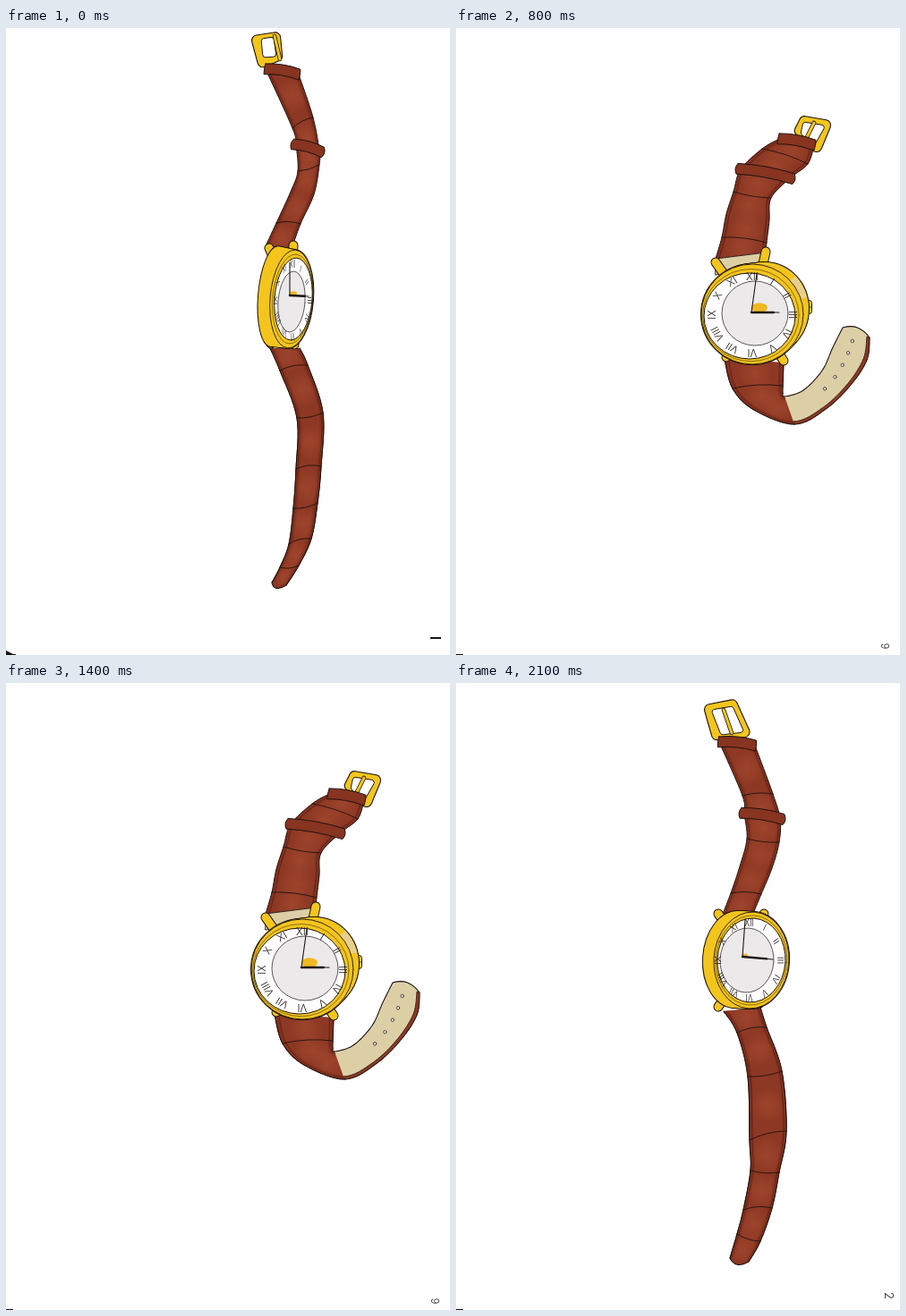
Animation of 496 by 701 pixels, one loop 2.2 s. Source, as an HTML page with a canvas:

```html
<!DOCTYPE html>
<html lang="en">
<head>
<meta charset="utf-8">
<title>Turning wristwatch</title>
<style>
html, body { margin: 0; width: 100%; height: 100%; overflow: hidden; background: #fefefe; }
canvas { display: block; width: 496px; height: 701px; }
</style>
</head>
<body>
<canvas id="stage"></canvas>
<script>
const STEP = 100, SHEETS = 12, LOOP = 2 * SHEETS - 2;
const INK = '#1d1310', GOLD = '#f3c51d', BROWN = '#8d3824', BEIGE = '#dccfa6', PAPER = '#fefefe';
const ROMAN = ['I', 'II', 'III', 'IV', 'V', 'VI', 'VII', 'VIII', 'IX', 'X', 'XI', 'XII'];
const SUB = 8; // curve samples between two stations

const canvas = document.getElementById('stage');
const ctx = canvas.getContext('2d');
const dpr = window.devicePixelRatio || 1;
canvas.width = 496 * dpr;
canvas.height = 701 * dpr;
ctx.scale(dpr, dpr);
ctx.lineJoin = ctx.lineCap = 'round';

// strap and tail: one station per row, left x,y then right x,y
// back, front, face, disc: cx, cy, rx, ry
const poses = {
  1: {
    strap: [290,46,327,52, 320,112,343,100, 324,131,350,138, 326,160,350,153, 318,183,344,186, 302,218,329,219, 289,246,318,250],
    tail: [295,358,328,358, 306,383,337,377, 325,436,354,430, 324,493,352,490, 321,537,348,531, 316,577,341,571, 306,603,327,601, 297,620,313,623],
    buckle: [273,9,306,4,309,35,283,46], hole: [285,12,299,10,302,32,287,33], prong: [300,9,306,35],
    back: [300,300,18,56], front: [319,303,24,55], face: [321,303,21,46], disc: [319,306,15,34],
    lugs: [294,246,321,243,296,353,322,354], hands: [317,299,317,262,338,300],
    crown: [342,300,2,6], tilt: .08, bill: 4, turn: 8
  },
  2: {
    strap: [294,66,334,70, 320,126,354,124, 322,146,362,152, 325,174,361,178, 317,205,353,207, 307,235,341,236, 298,258,331,260],
    tail: [299,367,340,363, 314,391,347,385, 326,440,364,434, 328,511,369,501, 329,545,361,547, 321,589,353,587, 314,616,340,624, 306,643,327,647],
    buckle: [276,25,312,18,331,60,287,64], hole: [285,30,309,26,322,55,296,58], prong: [299,30,308,56],
    back: [313,309,37,54], front: [330,310,42,54], face: [330,310,38,47], disc: [325,310,30,36],
    lugs: [293,258,344,258,293,362,338,359], hands: [320,306,323,265,354,309],
    crown: [371,308,3,9], tilt: .06, bill: 3, turn: 8
  },
  3: {
    strap: [285,71,332,69, 317,128,355,127, 320,149,363,156, 320,180,362,184, 315,208,356,212, 307,238,345,242, 303,264,340,264],
    tail: [308,371,351,366, 318,398,360,390, 338,446,376,438, 340,502,382,510, 337,549,375,552, 333,591,370,588, 328,622,357,627, 319,645,339,654],
    buckle: [270,25,315,22,327,62,283,64], hole: [279,33,309,29,320,58,288,60], prong: [294,34,300,59],
    back: [327,317,51,54], front: [330,317,51,53], face: [330,317,46,46], disc: [332,317,35,36],
    lugs: [296,263,347,262,303,375,356,366], hands: [330,316,331,277,363,316],
    crown: [382,312,5,9], tilt: 0, bill: 10, turn: 8
  },
  5: {
    strap: [305,70,353,74, 309,130,355,126, 309,150,357,155, 306,184,355,187, 305,210,354,213, 301,238,350,240, 298,264,346,266],
    tail: [309,373,360,376, 313,404,364,392, 327,447,371,445, 342,513,382,514, 343,551,382,555, 343,592,379,592, 351,622,382,626, 363,638,386,637],
    buckle: [297,27,346,22,354,72,302,70], hole: [305,36,344,33,348,68,307,66], prong: [322,30,327,66],
    back: [322,317,55,54], front: [326,317,54,53], face: [327,317,51,48], disc: [332,313,36,37],
    lugs: [296,255,352,254,303,384,359,378], hands: [331,313,335,272,363,313],
    crown: [388,312,8,13], tilt: 0, bill: 10, turn: 8
  },
  9: {
    strap: [361,124,400,131, 342,135,393,152, 318,158,373,168, 310,183,352,190, 302,208,350,215, 297,234,347,240, 290,258,346,251],
    tail: [300,370,366,374, 309,403,365,400, 333,427,365,408, 378,443,367,412, 413,426,388,405, 441,399,409,383, 459,371,421,357, 462,346,432,335],
    buckle: [386,98,421,104,405,143,377,116], hole: [388,105,413,109,400,132,385,118], prong: [400,106,391,124],
    back: [345,314,49,52], front: [331,320,57,56], face: [328,322,51,48], disc: [334,319,37,36],
    lugs: [290,262,346,250,302,368,366,372], hands: [330,318,336,275,361,318],
    crown: [393,312,9,15], tilt: 0, bill: 9, turn: 3
  },
  11: {
    strap: [409,139,436,149, 383,145,412,163, 334,166,384,178, 308,196,352,201, 297,228,347,224, 291,249,342,250, 288,268,342,267],
    tail: [318,378,366,366, 345,388,366,370, 378,374,367,368, 397,357,378,345, 415,333,390,318, 436,300,408,285, 452,250,423,240, 455,208,425,183],
    buckle: [419,123,458,126,437,149,410,139], hole: [422,129,446,131,434,143,418,136], prong: [437,127,426,140],
    back: [338,322,54,52], front: [329,325,59,57], face: [326,327,50,48], disc: [331,326,36,38],
    lugs: [284,274,346,262,300,372,370,372], hands: [329,328,335,290,364,330],
    crown: [392,327,6,16], tilt: 0, bill: 11, turn: 2
  }
};

const lerp = (a, b, t) => a + (b - a) * t;
function mix(a, b, t) {
  if (typeof a === 'number') return lerp(a, b, t);
  if (Array.isArray(a)) return a.map((v, i) => lerp(v, b[i], t));
  return Object.fromEntries(Object.keys(a).map(k => [k, mix(a[k], b[k], t)]));
}
// halfway through the curl the tail sweeps out to the right
poses[7] = {
  ...mix(poses[5], poses[9], .5), turn: 5,
  tail: [304,372,363,375, 311,404,364,396, 322,440,367,425, 342,476,378,452, 370,505,395,472, 405,515,415,480, 440,500,432,472, 462,478,447,455]
};
[[4, 3, 5, .5], [6, 5, 7, .5], [8, 7, 9, .5], [10, 9, 11, .5], [12, 9, 11, 1.35]]
  .forEach(([n, a, b, t]) => { poses[n] = mix(poses[a], poses[b], t); });

const pairs = list => Array.from({ length: list.length / 2 }, (_, i) => [list[2 * i], list[2 * i + 1]]);
const mid = (a, b, t = .5) => [lerp(a[0], b[0], t), lerp(a[1], b[1], t)];

function smooth(pts) {
  const out = [];
  for (let i = 0; i < pts.length - 1; i++) {
    const p = pts[Math.max(i - 1, 0)], a = pts[i], b = pts[i + 1], q = pts[Math.min(i + 2, pts.length - 1)];
    for (let s = 0; s < SUB; s++) {
      const t = s / SUB;
      out.push([0, 1].map(k => a[k] + .5 * t * (b[k] - p[k] +
        t * (2 * p[k] - 5 * a[k] + 4 * b[k] - q[k] + t * (3 * (a[k] - b[k]) + q[k] - p[k])))));
    }
  }
  return [...out, pts[pts.length - 1]];
}

function ribbon(list) {
  const all = pairs(list);
  const left = all.filter((_, i) => i % 2 === 0), right = all.filter((_, i) => i % 2);
  return { left, right, a: smooth(left), b: smooth(right) };
}

function trace(pts, closed = true) {
  ctx.beginPath();
  pts.forEach(p => ctx.lineTo(p[0], p[1]));
  if (closed) ctx.closePath();
}
function paint(fill, line = 1, color = INK) {
  if (fill) { ctx.fillStyle = fill; ctx.fill(); }
  if (line) { ctx.strokeStyle = color; ctx.lineWidth = line; ctx.stroke(); }
}
function oval([x, y, rx, ry], tilt = 0) {
  ctx.beginPath();
  ctx.ellipse(x, y, rx, ry, tilt, 0, 7);
}
function segment(a, b, width, color = INK) {
  trace([a, b], false);
  paint(null, width, color);
}

function across(l, r) {
  const d = Math.hypot(r[0] - l[0], r[1] - l[1]) || 1;
  return [(l[1] - r[1]) / d, (r[0] - l[0]) / d];
}
function crease(l, r, bow) {
  const n = across(l, r), c = mid(l, r);
  ctx.beginPath();
  ctx.moveTo(...l);
  ctx.quadraticCurveTo(c[0] - n[0] * bow, c[1] - n[1] * bow, ...r);
  paint(null, .9);
}
function band(l, r, half, reach) {
  const n = across(l, r), ext = [n[1] * reach, -n[0] * reach];
  const at = (p, side, k) => [p[0] + ext[0] * side + n[0] * k, p[1] + ext[1] * side + n[1] * k];
  const c = mid(l, r);
  ctx.beginPath();
  ctx.moveTo(...at(l, -1, -half));
  ctx.quadraticCurveTo(...at(c, 0, -half - 4), ...at(r, 1, -half));
  ctx.quadraticCurveTo(...at(r, 2, 0), ...at(r, 1, half));
  ctx.quadraticCurveTo(...at(c, 0, half - 4), ...at(l, -1, half));
  ctx.quadraticCurveTo(...at(l, -2, 0), ...at(l, -1, -half));
  paint('#873420', 1);
}

// marker shading: dark edges, lighter middles, stitching
function leather(a, b) {
  const shape = [...a, ...b.slice().reverse()];
  trace(shape);
  paint(BROWN, 0);
  ctx.save();
  trace(shape);
  ctx.clip();
  for (const edge of [a, b]) {
    trace(edge, false);
    paint(null, 9, 'rgba(95,25,15,.22)');
  }
  for (let i = SUB / 2; i < a.length; i += SUB) {
    const c = mid(a[i], b[i]);
    const glow = ctx.createRadialGradient(c[0], c[1], 2, c[0], c[1], 20);
    glow.addColorStop(0, 'rgba(178,82,54,.42)');
    glow.addColorStop(1, 'rgba(178,82,54,0)');
    ctx.fillStyle = glow;
    ctx.fillRect(c[0] - 20, c[1] - 20, 40, 40);
  }
  for (const t of [.07, .93]) {
    trace(a.map((p, i) => mid(p, b[i], t)), false);
    paint(null, .6, 'rgba(40,10,5,.6)');
  }
  ctx.restore();
  trace(a, false);
  paint(null, 1);
  trace(b, false);
  paint(null, 1);
}

function drawTail(pose) {
  const { left, right, a, b } = ribbon(pose.tail);
  const last = a.length - 1, cut = Math.round(Math.min(pose.turn, 7) * SUB);
  const end = mid(a[last], b[last]), prev = mid(a[last - 4], b[last - 4]);
  const run = Math.hypot(end[0] - prev[0], end[1] - prev[1]) || 1;
  const tip = [0, 1].map(k => end[k] + (end[k] - prev[k]) / run * 11);
  ctx.beginPath();
  a.forEach(p => ctx.lineTo(...p));
  ctx.bezierCurveTo(...mid(a[last], tip, .7), ...mid(b[last], tip, .7), ...b[last]);
  b.slice().reverse().forEach(p => ctx.lineTo(...p));
  paint(cut < last ? BEIGE : BROWN, 1.1);
  if (cut < last) {
    const rim = a.slice(cut), inner = rim.map((p, i) => mid(p, b[cut + i], .1));
    trace([...rim, ...inner.reverse()]);
    paint(BROWN, .8);
    for (let k = 0; k < 5; k++) {
      const u = 6.5 - k * .5, i = Math.round(u * SUB);
      if (u < pose.turn + .8) continue;
      oval([...mid(a[i], b[i], .55), 1.6, 1.8]);
      paint(PAPER, .8);
    }
  }
  leather(a.slice(0, cut + 1), b.slice(0, cut + 1));
  for (let i = 1; i < 7 && i < pose.turn - 1; i++) crease(left[i], right[i], i % 2 ? 5 : -4);
}

function drawBuckle({ buckle, hole, prong }) {
  const rounded = (list, r) => {
    const p = pairs(list);
    ctx.beginPath();
    ctx.moveTo(...mid(p[3], p[0]));
    p.forEach((c, i) => ctx.arcTo(...c, ...p[(i + 1) % 4], r));
    ctx.closePath();
  };
  rounded(buckle, 6);
  paint(GOLD, 1.1);
  rounded(hole, 3);
  paint(PAPER, 1);
  const [from, to] = pairs(prong);
  segment(from, to, 4.6);
  segment(from, to, 3, GOLD);
}

function drawStrap(pose) {
  const { left, right, a, b } = ribbon(pose.strap);
  leather(a, b);
  [1, 3, 5].forEach(i => crease(left[i], right[i], i === 3 ? -3 : 4));
  band(left[2], right[2], 6, 4);
  band(left[0], right[0], 6, 1);
  if (pose.turn < 5) {
    const down = ([x, y]) => [x, y + 18];
    trace([left[6], right[6], down(right[6]), down(left[6])]);
    paint(BEIGE, .9);
  }
}

function drawCase({ back, front, face, lugs, crown, tilt, turn }) {
  for (const tip of pairs(lugs)) {
    const base = mid(tip, front, .3);
    segment(tip, base, 11);
    segment(tip, base, 9, GOLD);
  }
  const [x, y, w, h] = crown;
  ctx.beginPath();
  ctx.roundRect(x - w / 2, y - h / 2, w, h, Math.min(w, h) / 3);
  paint(GOLD, 1);
  if (w > 4) segment([x - w / 2, y], [x + w / 2, y], .7);

  const shells = Array.from({ length: 9 }, (_, i) => mix(back, front, i / 8));
  shells.forEach(s => { oval(s, tilt); paint(null, 2); });
  shells.forEach(s => { oval(s, tilt); paint(GOLD, 0); });
  if (turn < 5) {
    ctx.beginPath();
    ctx.ellipse(back[0], back[1], back[2] - 6, back[3] - 6, 0, -.8, -.25);
    ctx.lineCap = 'butt';
    paint(null, 11, '#e8d08c');
    ctx.lineCap = 'round';
  }
  oval(front, tilt);
  paint(GOLD, .9);
  oval(mix(front, face, .55), tilt);
  paint(null, .5);
  oval(face, tilt);
  paint('#fdfdfd', 1);
}

function drawDial({ face, disc, hands, bill, tilt }) {
  oval(disc, tilt);
  paint('#ece9ea', .7);
  const ring = mix(face, disc, .48);
  ctx.fillStyle = INK;
  ctx.font = '300 11px Inter, "Liberation Sans", sans-serif';
  ctx.textAlign = 'center';
  ctx.textBaseline = 'middle';
  ROMAN.forEach((label, i) => {
    const turn = (i + 1) * Math.PI / 6;
    ctx.save();
    ctx.translate(ring[0] + Math.sin(turn) * ring[2], ring[1] - Math.cos(turn) * ring[3]);
    ctx.scale(face[2] / face[3], 1);
    ctx.rotate(turn);
    ctx.fillText(label, 0, 0);
    ctx.restore();
  });
  const [hub, up, side] = pairs(hands);
  oval([hub[0] + bill, hub[1] - bill * .6, bill, bill * .6]);
  paint('#efb921', 0);
  segment(hub, up, 1.1);
  segment(hub, side, 1.2);
  segment(hub, mid(hub, side, .8), 2.4);
}

function drawMarks(n) {
  ctx.fillStyle = INK;
  ctx.fillRect(0, 700, n === 1 ? 11 : 8, 1);
  if (n === 1) {
    trace([[0, 696], [10, 701], [0, 701]]);
    paint(INK, 0);
    ctx.fillRect(474, 681, 12, 2);
    return;
  }
  if (n === 3) {
    trace([[462, 682], [470, 678], [480, 683], [472, 687]]);
    paint(INK, 1);
  }
  const spot = { 2: [483, 685], 3: [477, 672], 5: [478, 678], 9: [478, 691] }[n] || [482, 684];
  ctx.save();
  ctx.translate(...spot);
  ctx.rotate(n === 5 ? 1.9 : Math.PI / 2);
  ctx.font = `300 ${n === 5 ? 18 : n < 4 ? 13 : 11}px Inter, "Liberation Sans", sans-serif`;
  ctx.textAlign = 'center';
  ctx.textBaseline = 'middle';
  ctx.fillText(n, 0, 0);
  ctx.restore();
}

function draw(n) {
  const pose = poses[n];
  ctx.fillStyle = PAPER;
  ctx.fillRect(0, 0, 496, 701);
  drawTail(pose);
  drawBuckle(pose);
  drawStrap(pose);
  drawCase(pose);
  drawDial(pose);
  drawMarks(n);
}

// sheets run forward, then back
let shown = 0;
const start = performance.now();
function tick() {
  const i = Math.floor((performance.now() - start) / STEP) % LOOP;
  const n = i < SHEETS ? i + 1 : LOOP + 1 - i;
  if (n !== shown) draw(shown = n);
  requestAnimationFrame(tick);
}
tick();
</script>
</body>
</html>
```
